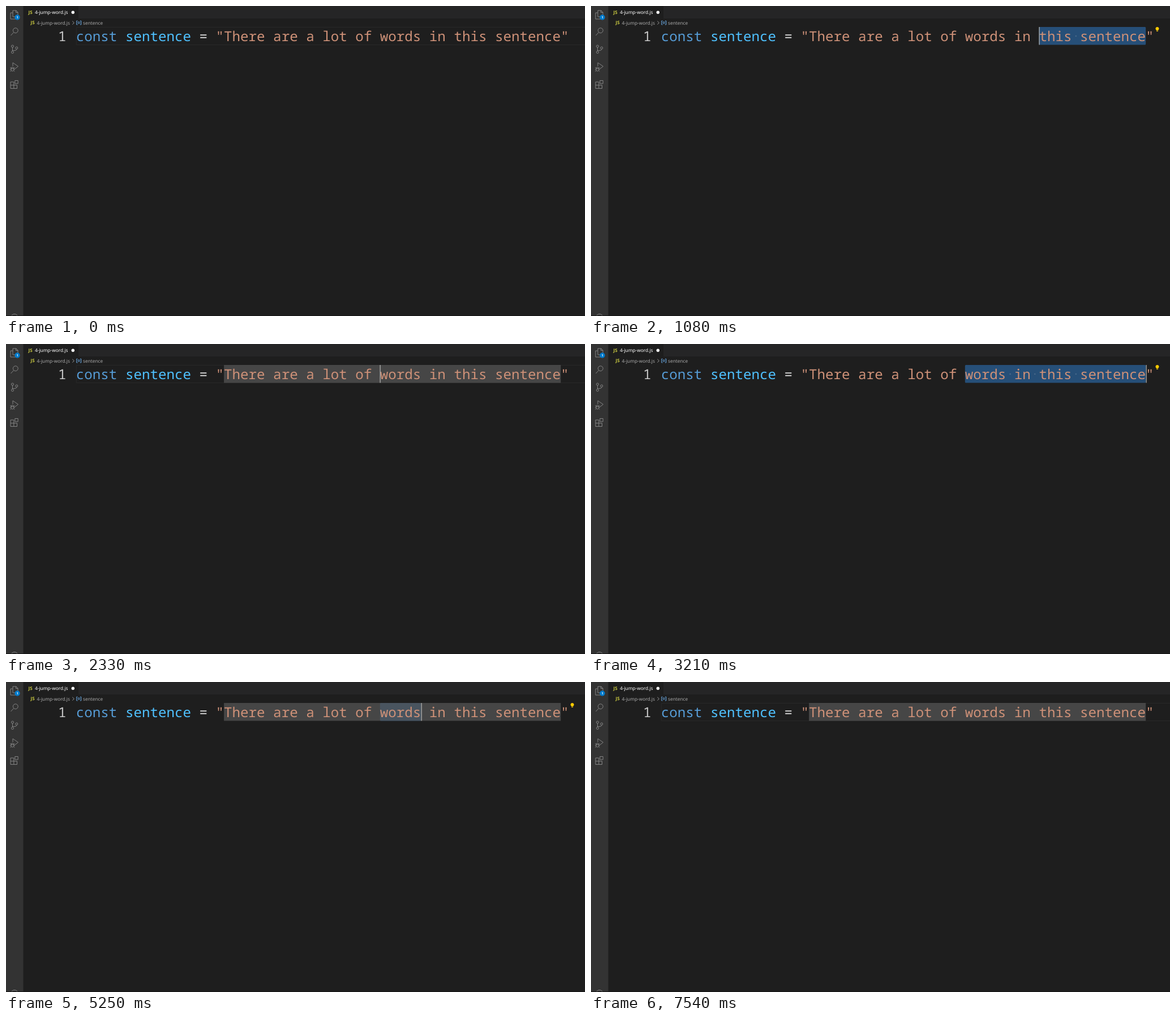
Recreate the animation shown at these times as an HTML page. Size 1023 by 547 pixels, loop 7.58 s.

```html
<!DOCTYPE html>
<html lang="en">
<head>
<meta charset="utf-8">
<title>Jumping by word</title>
<style>
html, body { margin: 0; width: 100%; height: 100%; overflow: hidden; background: #1e1e1e; }
svg { display: block; width: 1023px; height: 547px; }
text { white-space: pre; text-rendering: geometricPrecision; }
.code { font: 24.19px "Noto Sans Mono", "DejaVu Sans Mono", monospace; }
.ui { font: 8.3px "Noto Sans", "Open Sans", sans-serif; }
.js { font: 700 8px "Noto Sans", "Open Sans", sans-serif; fill: #cbcb41; }
.icon { fill: none; stroke: #858585; stroke-width: 1; stroke-linejoin: round; }
</style>
</head>
<body>
<svg viewBox="0 0 1023 547">
  <rect width="1023" height="547" fill="#1e1e1e"/>
  <rect width="1023" height="22" fill="#252526"/>
  <rect x="30" width="98" height="22" fill="#1e1e1e"/>
  <rect width="30.5" height="547" fill="#333"/>

  <g class="icon">
    <path d="M12 8h6l3 3v8h-9zM17.5 8v3.500h3.500M12 12h-4v11h9v-3.500"/>
    <circle cx="16.800" cy="43.200" r="4.400"/>
    <path d="M13.600 46.500 8.500 52"/>
    <circle cx="11.500" cy="71" r="2"/>
    <circle cx="11.500" cy="81.500" r="2"/>
    <circle cx="18.800" cy="74" r="2"/>
    <path d="M11.500 73v6.500M18.800 76q-.3 2.500-3 2.500h-2q-2 0-2.300 1.500"/>
    <path d="M12 106v-6l9.500 6.500-6.500 5"/>
    <path d="M9 110.500a2.400 2.400 0 0 1 4.800 0v2a2.400 2.400 0 0 1-4.800 0zM9 110.500h4.800M7.500 108.500l1.500 1M15.300 108.500l-1.500 1M7.300 112h1.700M13.800 112h1.700M7.500 115.500l1.500-1.300M15.300 115.500l-1.500-1.300"/>
    <path d="M8 134h5.800v11.500h-5.800zM8 139.700h11.500v5.800h-5.700M15.800 131.500h5.400v5.400h-5.400z"/>
    <circle cx="15" cy="550" r="6.500"/>
  </g>
  <circle cx="20" cy="20" r="4.700" fill="#007acc"/>
  <text x="20" y="22" text-anchor="middle" fill="#fff" style="font:600 5.500px 'Noto Sans',sans-serif">1</text>

  <text class="js" x="39.500" y="13.800">JS</text>
  <text class="ui" x="51" y="14" fill="#fff">4-jump-word.js</text>
  <circle cx="118.300" cy="11.200" r="2.700" fill="#fff"/>
  <text class="js" x="43.500" y="32">JS</text>
  <text class="ui" x="54.500" y="32.500" fill="#a9a9a9">4-jump-word.js</text>
  <path d="M117.300 26.800l3 2.900-3 2.900" fill="none" stroke="#a9a9a9" stroke-width=".9"/>
  <g fill="none" stroke="#75beff" stroke-width=".9">
    <path d="M126.500 26.300h-1.700v6.600h1.700M131 26.300h1.700v6.600h-1.700"/>
    <circle cx="128.750" cy="29.500" r="1.600"/>
  </g>
  <text class="ui" x="136" y="32.500" fill="#a9a9a9">sentence</text>

  <path id="line" d="M1023 37.500H124.300V68.500H1023" fill="none" stroke="#282828"/>
  <rect id="match" y="37" height="31.500" fill="#add6ff" fill-opacity=".15"/>
  <rect id="selection" y="37" height="31.500" rx="1.500" fill="#264f78"/>
  <rect id="string" y="37" height="31.500" fill="#575757" fill-opacity=".72"/>
  <text class="code" x="92" y="62" fill="#c6c6c6">1</text>
  <text class="code" id="code" y="62"></text>
  <g id="dots" fill="#e3e4e2" fill-opacity=".18"></g>
  <rect id="caret" y="37" width="1.300" height="31.500" fill="#aeafad"/>
  <g id="bulb">
    <path d="M1000.500 37a3 3 0 0 1 1.700 5.500v.8h-3.400v-.8a3 3 0 0 1 1.700-5.500z" fill="#fc0"/>
    <path d="M999 43.800h3v1.200h-3z" fill="#d8b11a"/>
  </g>
  <rect y="546" width="1023" height="1" fill="#161616"/>
</svg>
<script>
const LOOP = 7580, LEFT = 123.8, CELL = 14.515;
const NS = "http://www.w3.org/2000/svg";
const $ = id => document.getElementById(id);
const colX = col => LEFT + col * CELL;

function add(parent, tag, attrs, text = "") {
  const el = document.createElementNS(NS, tag);
  for (const key in attrs) el.setAttribute(key, attrs[key]);
  el.textContent = text;
  parent.append(el);
  return el;
}

const tokens = [
  ["const ", "#569cd6"],
  ["sentence ", "#4fc1ff"],
  ["= ", "#d4d4d4"],
  ['"There are a lot of words in this sentence"', "#ce9178"]
];
const source = tokens.map(token => token[0]).join("");
$("code").setAttribute("x", LEFT);
for (const [text, fill] of tokens) add($("code"), "tspan", { fill }, text);

const dots = [];
[...source].forEach((ch, col) => {
  if (ch === " ") dots.push({ col, el: add($("dots"), "circle", { cx: colX(col + .5), cy: 53, r: 1.3 }) });
});

// Column stops of the word jumps
const OPEN = 18, WORDS = 37, WORDS_END = 42, IN = 43, IN_END = 45,
      THIS = 46, THIS_END = 50, LAST = 51, END = 59;

const at = (time, change) => ({ time, change });
const jump = col => ({ anchor: col, caret: col, on: 1, bulb: 0 });

const events = [
  at(0, { anchor: 60, caret: 60, on: 0, string: 0, bulb: 0, match: 0 }),
  at(40, { on: 1 }),
  at(250, jump(END)),
  at(500, { string: 1 }),
  // Select back word by word
  at(670, { caret: LAST }),
  at(920, { bulb: 1, match: 1 }),
  at(1080, { caret: THIS, string: 0, match: 0 }),
  at(1380, { caret: IN }),
  at(1710, { caret: WORDS }),
  // Select forward
  at(2080, jump(WORDS)),
  at(2330, { string: 1 }),
  at(2380, { caret: WORDS_END }),
  at(2630, { bulb: 1 }),
  at(2670, { caret: IN_END, string: 0 }),
  at(2960, { caret: THIS_END }),
  at(3210, { caret: END }),
  at(3710, { on: 0 }),
  // Shrink to nothing, then pick one word
  at(4170, { caret: LAST, on: 1 }),
  at(4290, { caret: THIS }),
  at(4420, { caret: IN }),
  at(4540, jump(WORDS)),
  at(4790, { string: 1 }),
  at(5000, { caret: WORDS_END }),
  at(5250, { bulb: 1 })
];
// Quick toggling of the same word
[5540, 5713, 5887, 6060, 6233, 6407, 6580, 6830, 7040].forEach((time, i) =>
  events.push(at(time, i % 2 ? { caret: WORDS_END } : jump(WORDS))));
events.push(at(7540, { on: 0 }));

function span(el, from, to) {
  el.setAttribute("x", colX(from));
  el.setAttribute("width", (to - from) * CELL);
}
const show = (el, visible) => el.setAttribute("visibility", visible ? "visible" : "hidden");

span($("match"), 6, 14);
span($("string"), OPEN, END);

function draw(time) {
  const state = {};
  for (const event of events) if (event.time <= time) Object.assign(state, event.change);
  const from = Math.min(state.anchor, state.caret), to = Math.max(state.anchor, state.caret);
  span($("selection"), from, to);
  show($("selection"), from < to);
  show($("line"), from === to);
  show($("match"), state.match);
  show($("string"), state.string);
  show($("bulb"), state.bulb);
  show($("caret"), state.on);
  $("caret").setAttribute("x", Math.floor(colX(state.caret)) + .5);
  for (const { col, el } of dots) show(el, col >= from && col < to);
}

const start = performance.now();
function tick() {
  draw((performance.now() - start) % LOOP);
  requestAnimationFrame(tick);
}
tick();
</script>
</body>
</html>
```
